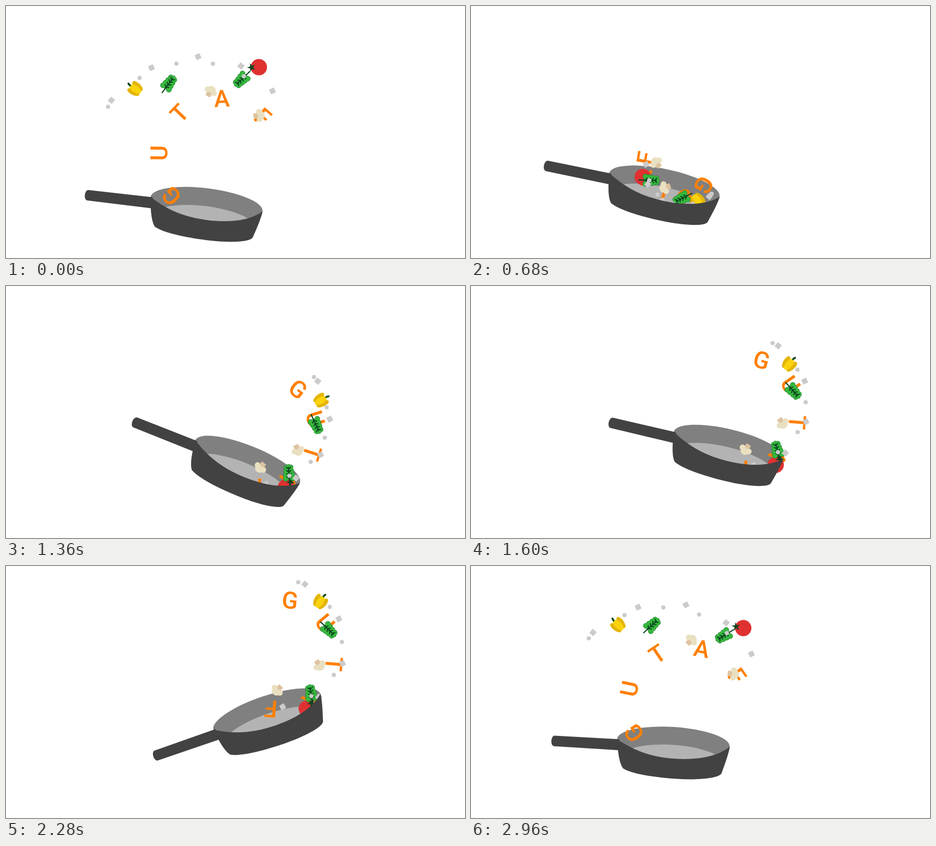
These frames come from a looping animation (871x479 px, 3000 ms). An HTML page with a canvas:

```html
<!DOCTYPE html>
<html lang="en">
<head>
<meta charset="utf-8">
<title>Pan toss</title>
<style>
  html, body { margin: 0; width: 100%; height: 100%; overflow: hidden; background: #fff; }
  canvas { display: block; }
</style>
</head>
<body>
<canvas width="871" height="479"></canvas>
<script>
const ctx = document.querySelector('canvas').getContext('2d');
const LOOP = 3, FPS = 20, RAD = Math.PI / 180;

// Periodic monotone cubic through keys [time, v1, v2, ...].
function track(keys) {
  const n = keys.length;
  const time = i => keys[(i + n) % n][0] + LOOP * Math.floor(i / n);
  const value = (i, k) => keys[(i + n) % n][k];
  const slope = (i, k) => (value(i + 1, k) - value(i, k)) / (time(i + 1) - time(i));
  const tangent = (i, k) => {
    const a = slope(i - 1, k), b = slope(i, k);
    return a * b <= 0 ? 0 : 2 * a * b / (a + b);
  };
  return t => {
    let i = n - 1;
    while (time(i) > t) i--;
    const h = time(i + 1) - time(i), s = (t - time(i)) / h, r = 1 - s;
    return keys[0].slice(1).map((_, j) => {
      const k = j + 1;
      return r * r * (1 + 2 * s) * value(i, k) + s * s * (3 - 2 * s) * value(i + 1, k)
        + h * s * r * (r * tangent(i, k) - s * tangent(i + 1, k));
    });
  };
}

function place([x, y, angle], draw) {
  ctx.save();
  ctx.translate(x, y);
  ctx.rotate(angle * RAD);
  draw();
  ctx.restore();
}

function fill(color, d) {
  ctx.fillStyle = color;
  ctx.fill(new Path2D(d));
}

function stroke(color, width, d) {
  ctx.strokeStyle = color;
  ctx.lineWidth = width;
  ctx.stroke(new Path2D(d));
}

function oval(color, x, y, rx, ry = rx, tilt = 0) {
  ctx.fillStyle = color;
  ctx.beginPath();
  ctx.ellipse(x, y, rx, ry, tilt, 0, 2 * Math.PI);
  ctx.fill();
}

const letter = char => () => {
  ctx.fillStyle = '#ff7f00';
  ctx.font = '500 45px Roboto, sans-serif';
  ctx.textAlign = 'center';
  ctx.fillText(char, 0, 16);
};

function tomato() {
  oval('#e03131', 0, 0, 15.5);
  ctx.fillStyle = '#0f4420';
  ctx.beginPath();
  for (let i = 0; i < 10; i++) {
    const r = i % 2 ? 3.2 : 8.5, a = i * Math.PI / 5 - Math.PI / 2;
    ctx.lineTo(r * Math.cos(a), -14 + r * Math.sin(a));
  }
  ctx.fill();
}

function pepper() {
  for (const side of [-1, 1]) oval('#e3b505', 7 * side, 0, 5.5, 12.5, 0.15 * side);
  oval('#fbd30c', 0, 0, 6.5, 12.5);
  stroke('#0b4a1e', 3.5, 'M0-11Q-1-15 2-18');
}

function leaf() {
  for (const [color, rim] of [['#1d6b2a', 0.6], ['#35b83d', 0]]) {
    oval(color, 0, -1, 6 + rim, 15 + rim);
    for (let row = 0; row < 4; row++) {
      for (const side of [-1, 1]) oval(color, side * (4 + row), -10 + row * 7, 4.6 + rim);
    }
  }
  stroke('#0c4420', 2.2, 'M0-11V24');
  for (let y = -7; y < 12; y += 6) stroke('#0c4420', 2, `M-5 ${y - 4}L0 ${y}L5 ${y - 4}`);
}

function mushroom() {
  fill('#dec3a0', 'M-5 0H5V11H-5Z');
  oval('#e9e0c1', 0, -4, 8, 6.5);
  for (const side of [-1, 1]) oval('#e9e0c1', 7 * side, 0, 5.5);
}

const cube = () => fill('#cbcbcb', 'M-5-5H5V5H-5Z');
const crumb = () => oval('#cbcbcb', 0, 0, 4);

function panInside() {
  oval('#808080', 0, 0, 107, 30);
  oval('#b3b3b3', 0, 34, 98, 30);
}

function panFront() {
  fill('#424242', 'M-103 0L-226 1.5C-233 3-233 20-226 21.5L-101 21Z');
  fill('#424242', 'M-107 0C-70 22-35 30 5 30S85 22 107.5 0C106 15 100 35 95 52'
    + 'C90 62 50 68 10 68C-35 68-75 64-92 55C-100 45-104 25-107 0Z');
}

// time, x, y, angle
const pan = track([
  [0, 380.5, 376.5, 7.2], [0.13, 378, 395, 8.8], [0.65, 367, 340, 12.1], [1.2, 426, 344, 21.5],
  [1.35, 458.5, 333.5, 22.1], [1.85, 503.3, 280, -0.4], [2.25, 495, 277, -18.7],
  [2.4, 476, 286, -19.5], [2.65, 426.5, 284, -9.1], [2.8, 368, 305, -4], [2.95, 384, 336, 3.8]
]);

// The food forms an arc above the pan: time, height of its centre, radius, lead of the head, sweep
const arc = track([
  [0, 86, 115, 142, 174], [0.65, 35, 62, 113, 160], [1.35, 58, 107, 114, 142],
  [1.85, 65, 108, 141, 174], [2.25, 109, 105, 191, 178], [2.65, 99, 108, 151, 205],
  [2.95, 71, 112, 146, 178]
]);

// Along the arc 0 is the head and 1 the tail; out scales the radius; face is the turn against the arc.
// Loose items trail and fly wider at the top of the throw.
function pose(t, { along, out = 1, face = 85, loose = true, fixed }) {
  const [panX, panY] = pan(t), [lift, radius, lead, sweep] = arc(t);
  const hang = loose ? Math.max(0, Math.cos(2 * Math.PI * t / LOOP)) ** 6 : 0;
  const u = along + 0.35 * hang * (1 - along);
  const r = radius * out * (1 + 0.5 * hang);
  const angle = lead - 360 * t / LOOP + sweep * u;
  return [panX + 24 + r * Math.cos(angle * RAD), panY - lift + r * Math.sin(angle * RAD), fixed ?? angle + face];
}

const items = [
  ...[...'GUTAF'].map((char, i) => ({ draw: letter(char), along: i / 4, loose: false })),
  { draw: tomato, along: 0.8, out: 1.1, face: -25 },
  { draw: pepper, along: 0.15, out: 1.2 },
  { draw: leaf, along: 0.3, face: 160 },
  { draw: leaf, along: 0.73, out: 0.9, face: -60 },
  { draw: mushroom, along: 0.53, out: 0.75, face: 130 },
  { draw: mushroom, along: 0.97, out: 0.65, face: 130 }
];
for (let i = 0; i < 5; i++) {
  const out = 1.35 - 0.1 * i;
  items.push({ draw: cube, along: 0.05 + 0.22 * i, out, fixed: i % 3 ? -27 : 40 });
  items.push({ draw: crumb, along: 0.02 + 0.18 * i, out, fixed: 0 });
}

function render() {
  const t = Math.floor(performance.now() / 1000 * FPS) / FPS % LOOP;
  ctx.fillStyle = '#fff';
  ctx.fillRect(0, 0, 871, 479);
  place(pan(t), panInside);
  items.forEach(item => place(pose(t, item), item.draw));
  place(pan(t), panFront);
  requestAnimationFrame(render);
}
render();
</script>
</body>
</html>
```
